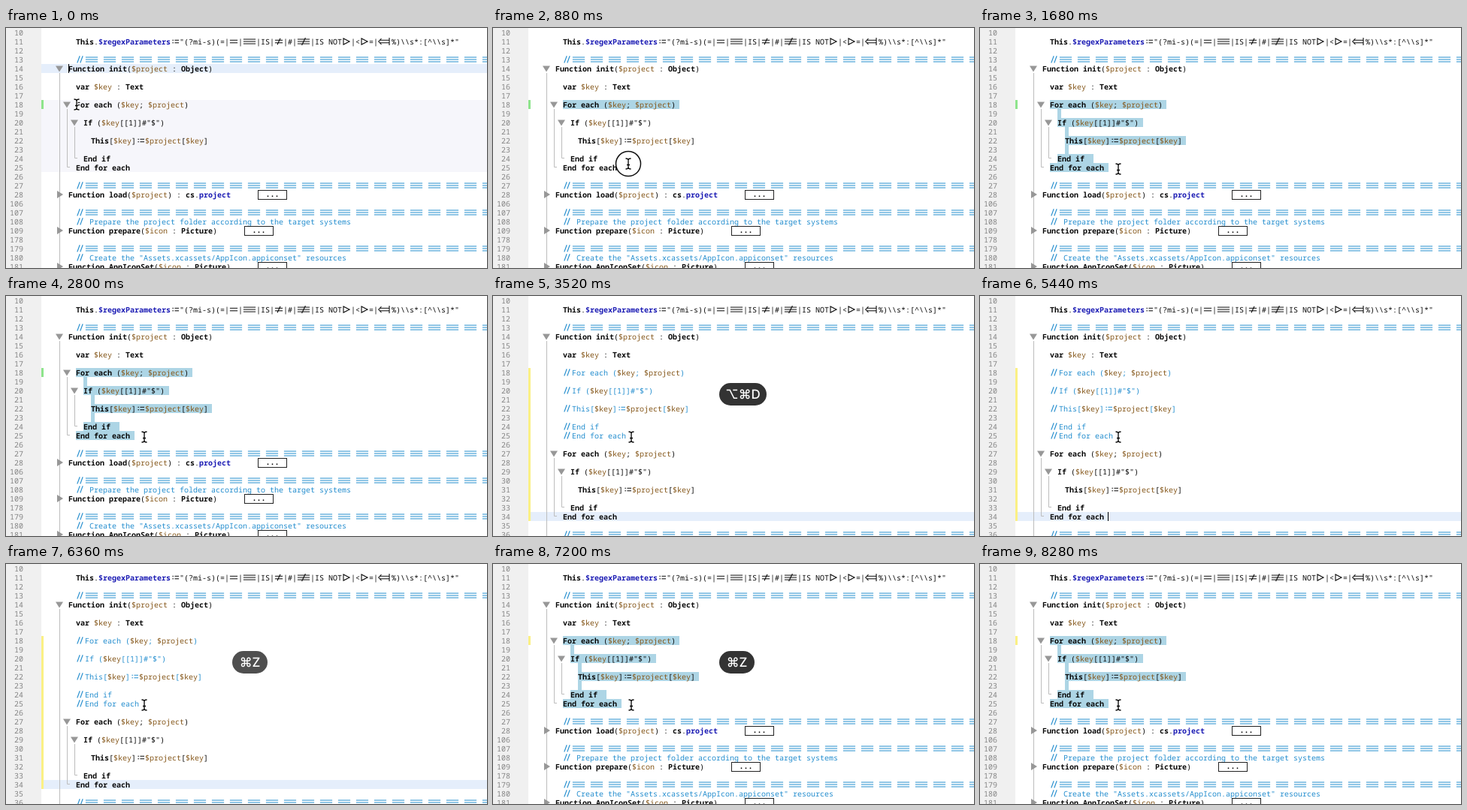
An HTML page for the animation above (8320 ms loop, 640x320 px).

```html
<!DOCTYPE html>
<html lang="en">
<head>
<meta charset="utf-8">
<title>Code editor</title>
<style>
  html, body { margin: 0; width: 100%; height: 100%; overflow: hidden; background: #fff; }
  svg { display: block; width: 640px; height: 320px; }
  text { font: 500 10px "Noto Sans Mono", "DejaVu Sans Mono", monospace; white-space: pre; text-rendering: geometricPrecision; }
  .num { font-weight: 400; fill: #858585; text-anchor: end; }
  .word { font-weight: 700; }
  .key { font: 500 17px Inter, "DejaVu Sans", sans-serif; fill: #fff; text-anchor: middle; }
</style>
</head>
<body>
<svg id="stage" viewBox="0 0 640 320"></svg>
<script>
const LOOP = 8320;
const INK = '#0a0a0a', BLUE = '#1c1cb4', BROWN = '#85571a', NOTE = '#238dce';
const SLASHES = '/'.repeat(2);
const stage = document.getElementById('stage');

function add(parent, tag, attrs, content) {
  const el = document.createElementNS('http://www.w3.org/2000/svg', tag);
  for (const k in attrs) el.setAttribute(k, attrs[k]);
  if (content !== undefined) el.textContent = content;
  parent.appendChild(el);
  return el;
}
const group = (parent = stage) => add(parent, 'g', {});
const rect = (parent, x, y, width, height, fill) => add(parent, 'rect', { x, y, width, height, fill });
const line = (parent, d, stroke, w = 1) =>
  add(parent, 'path', { d, stroke, 'stroke-width': w, fill: 'none' });
const rowY = row => (row - 10) * 12;

/* Joined operators, drawn around the middle of the row */
const TWO = 'M.9-1.8H11.1M.9 1.8H11.1', THREE = 'M.9-3H17.1M.9 0H17.1M.9 3H17.1';
const JOINED = {
  '==': TWO,
  '===': THREE,
  '!=': TWO + 'M4 4.2L8-4.2',
  '!==': THREE + 'M6.6 5L11.4-5',
  '|>': 'M2-4V4L10 0Z',
  '>=': 'M3-4L9-1.4L3 1.2M9 1.4L3 4',
  '<=|': 'M4.5-4L.8 0L4.5 4M2.6-1.8H15M2.6 1.8H15M15-5V5',
  [SLASHES]: 'M1.8 4.5L5.2-4.8M5.8 4.5L9.2-4.8',
  ':=': 'M2.4-1.8H4M2.4 1.8H4M5.4-1.8H11M5.4 1.8H11'
};
const SPLIT = /(!==|===|==|!=|\|>|>=|<=\||\/{2}|:=)/;
const TOKENS = /("[^"]+")|((?<=\.)\$?\w+)|(\$\w+)|([A-Za-z]\w*)|[^\sA-Za-z$"]+|["$]/g;

function span(parent, x, row, str, fill, bold) {
  for (const part of str.split(SPLIT)) {
    if (JOINED[part]) {
      line(parent, JOINED[part], fill, 1.1).setAttribute('transform', `translate(${x} ${rowY(row) + 6})`);
    } else if (part.trim()) {
      add(parent, 'text', { x, y: rowY(row) + 9.6, fill, class: bold ? 'word' : '' }, part);
    }
    x += part.length * 6;
  }
}

function code(parent, row, x, str) {
  for (const m of str.matchAll(TOKENS)) {
    const [, text, prop, name, word] = m;
    const fill = prop ? BLUE : name ? BROWN : INK;
    span(parent, x + m.index * 6, row, m[0], fill, !text && (prop || word));
  }
}

function remark(parent, row, str) {
  let x = 93;
  for (const part of (SLASHES + str).split(/(\$\w+)/)) {
    span(parent, x, row, part, /^\$\w/.test(part) ? BROWN : NOTE);
    x += part.length * 6;
  }
}

const number = (parent, row, n) => add(parent, 'text', { x: 23, y: rowY(row) + 9.6, class: 'num' }, n);
const rule = (parent, row) => remark(parent, row, '=== '.repeat(23));

function arrow(parent, x, row, folded) {
  const y = rowY(row) + 6;
  const d = folded ? `M${x - 3} ${y - 5}L${x + 5} ${y}L${x - 3} ${y + 5}Z`
                   : `M${x - 5} ${y - 3.5}H${x + 5}L${x} ${y + 4.5}Z`;
  add(parent, 'path', { d, fill: '#979797' });
}

function folded(parent, row, str) {
  code(parent, row, 83, str);
  arrow(parent, 71, row, true);
  const x = 83 + str.length * 6 + 36, y = rowY(row);
  add(parent, 'rect', { x: x + .5, y: y + .5, width: 38, height: 12, fill: '#fff', stroke: '#222' });
  add(parent, 'text', { x: x + 10.5, y: y + 8.6, class: 'word' }, '...');
}

const BLOCK = [
  [0, 93, 'For each ($key; $project)'],
  [2, 103, 'If ($key[[1]]#"$")'],
  [4, 113, 'This[$key]:=$project[$key]'],
  [6, 103, 'End if'],
  [7, 93, 'End for each']
];

function block(parent, top) {
  const y = rowY(top);
  line(parent, `M81.5 ${y + 12}V${y + 89.5}H85`, '#bdbdbd');
  line(parent, `M91.5 ${y + 36}V${y + 77.5}H95`, '#bdbdbd');
  arrow(parent, 81, top);
  arrow(parent, 91, top + 2);
  for (const [dy, x, str] of BLOCK) code(parent, top + dy, x, str);
}

/* Backgrounds */
rect(stage, 0, 0, 640, 320, '#fff');
rect(stage, 0, 0, 47, 320, '#f0f0f0');
const hover = group();
rect(hover, 47, 48, 593, 12, '#e5eefb');
rect(hover, 47, 96, 593, 96, '#f6f6fb');
rect(hover, 83, 48, 1, 12, '#000');
const mark = rect(stage, 47, 96, 3, 12, '#8ee48c');

/* Selected rows: row, left, right, start and end of growth */
const PICKED = [
  [18, 93, 248, 200, 680],
  [19, 103, 108, 920, 920],
  [20, 103, 217, 920, 960],
  [21, 113, 118, 960, 960],
  [22, 113, 274, 960, 1040],
  [23, 113, 118, 1040, 1040],
  [24, 103, 151, 1040, 1080],
  [25, 93, 171, 1080, 1200]
].map(([row, x, end, from, to]) =>
  ({ el: rect(stage, x, rowY(row), 0, 12, '#add5e5'), size: end - x, from, to }));

/* Rows that never change */
line(stage, 'M71.5 60V320', '#bdbdbd');
for (let r = 10; r <= 28; r++) number(stage, r, r);
code(stage, 11, 93, 'This.$regexParameters:="(?mi-s)(=|==|===|IS|!=|#|!==|IS NOT|>|<|>=|<=|%)\\\\s*:[^\\\\s]*"');
rule(stage, 13);
arrow(stage, 71, 14);
code(stage, 14, 83, 'Function init($project : Object)');
code(stage, 16, 93, 'var $key : Text');

/* Plain view */
const plain = group();
block(plain, 18);
[106, 107, 108, 109, 178, 179, 180, 181].forEach((n, i) => number(plain, 29 + i, n));
[27, 30, 34].forEach(r => rule(plain, r));
folded(plain, 28, 'Function load($project) : cs.project');
remark(plain, 31, ' Prepare the project folder according to the target systems');
folded(plain, 32, 'Function prepare($icon : Picture)');
remark(plain, 35, ' Create the "Assets.xcassets/AppIcon.appiconset" resources');
folded(plain, 36, 'Function AppIconSet($icon : Picture)');

/* View with the block commented out and repeated below */
const doubled = group();
rect(doubled, 47, 96, 3, 204, '#fbf084');
rect(doubled, 50, 288, 590, 12, '#e5eefb');
for (let r = 29; r <= 36; r++) number(doubled, r, r);
for (const [dy, , str] of BLOCK) remark(doubled, 18 + dy, str);
line(doubled, 'M71.5 288V300', '#bdbdbd');
block(doubled, 27);
rule(doubled, 36);
const caret = rect(doubled, 170, 288, 1, 12, '#000');

/* Pointer */
const pointer = group();
const ring = add(pointer, 'circle', { r: 16.5, fill: '#fff', 'fill-opacity': .6, stroke: '#111', 'stroke-width': 1.5 });
const BEAM = 'M-3.5-7Q0-7 0-5Q0-7 3.5-7M0-5V5M-3.5 7Q0 7 0 5Q0 7 3.5 7M-2 1.5H2';
line(pointer, BEAM, '#fff', 3);
line(pointer, BEAM, '#000', 1.3);

/* Shortcut badges */
function badge(width, label, start) {
  const el = group();
  add(el, 'rect', { x: 301, y: 116, width, height: 30, rx: 15, fill: '#333' });
  add(el, 'text', { x: 301 + width / 2, y: 137, class: 'key' }, label);
  return { el, start };
}
const badges = [badge(63, '⌥⌘D', 3120), badge(47, '⌘Z', 6160)];

const clamp = v => Math.max(0, Math.min(1, v));
const ramp = (t, a, b) => a === b ? +(t >= a) : clamp((t - a) / (b - a));
const show = (el, on) => el.setAttribute('display', on ? 'inline' : 'none');

const PATH = [[0, 94, 102], [160, 94, 102], [400, 122, 116], [640, 160, 152], [880, 180, 181], [1200, 184, 188]];
function pointerAt(t) {
  const i = PATH.findIndex(p => p[0] > t);
  if (i < 0) return PATH[PATH.length - 1].slice(1);
  const a = PATH[i - 1], b = PATH[i], k = ramp(t, a[0], b[0]);
  return [a[1] + (b[1] - a[1]) * k, a[2] + (b[2] - a[2]) * k];
}

function draw(t) {
  const edited = t >= 3520 && t < 6560;
  show(hover, t < 120);
  show(plain, !edited);
  show(doubled, edited);
  show(mark, !edited);
  mark.setAttribute('fill', t < 3520 ? '#8ee48c' : '#fbf084');
  show(caret, t >= 5040 && t < 5600);

  for (const { el, size, from, to } of PICKED) {
    show(el, !edited);
    el.setAttribute('width', size * ramp(t, from, to));
  }

  const press = ramp(t, 60, 200) * (1 - ramp(t, 1040, 1200));
  pointer.setAttribute('transform', `translate(${pointerAt(t).join(' ')})`);
  ring.setAttribute('opacity', press);
  ring.setAttribute('r', 10 + 6.5 * press);

  for (const { el, start } of badges) {
    const s = t - start;
    el.setAttribute('opacity', ramp(s, -40, 240) * (1 - ramp(s, 1600, 2000)));
  }
}

const begin = performance.now();
function tick() {
  draw((performance.now() - begin) % LOOP);
  requestAnimationFrame(tick);
}
draw(0);
requestAnimationFrame(tick);
</script>
</body>
</html>
```
